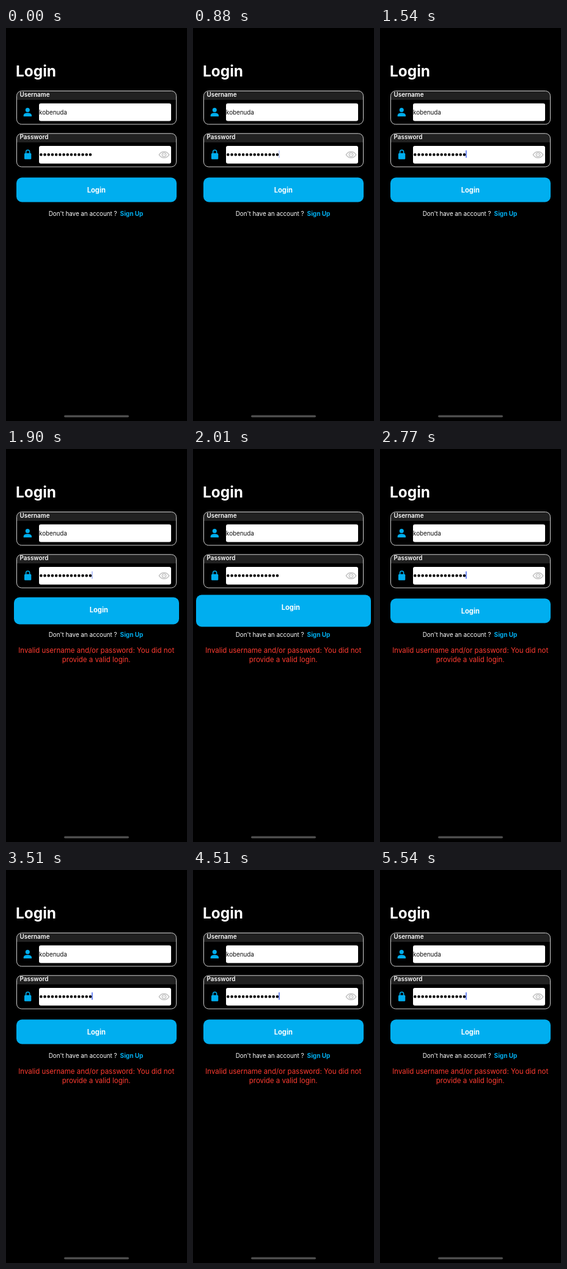
Animation of 296 by 640 pixels, one loop 5590 ms. Source, as an HTML page:

```html
<!DOCTYPE html>
<html lang="en">
<head>
<meta charset="utf-8">
<title>Login</title>
<style>
  @property --grow { syntax: "<length>"; inherits: true; initial-value: 0px; }
  html, body { margin: 0; width: 100%; height: 100%; overflow: hidden; background: #000; }
  svg { display: block; width: 100%; height: 100%; }
  text { font-family: Inter, Roboto, sans-serif; fill: #fff; }
  .title { font-size: 24.4px; font-weight: 700; }
  .label { font-size: 9.9px; font-weight: 600; }
  .value { font-size: 9.8px; fill: #111; }
  .hint { font-size: 9.8px; }
  .link { font-size: 10px; font-weight: 700; fill: #00aeef; }
  .error { font-size: 11.47px; fill: #ff3b30; text-anchor: middle; }
  .accent { fill: #00aeef; }
  #button rect {
    x: calc(17px - var(--grow));
    y: calc(243.5px - var(--grow) / 2);
    width: calc(262px + 2 * var(--grow));
    height: calc(40px + var(--grow));
  }
  #button text {
    font-size: 11.1px; font-weight: 700; text-anchor: middle;
    transform: translate(var(--grow), calc(var(--grow) / -2));
  }
</style>
</head>
<body>
<svg viewBox="0 0 296 640">
  <defs>
    <g id="field">
      <path d="M17.5 117V110.500a8 8 0 0 1 8-8H270.500a8 8 0 0 1 8 8V117Z" fill="#212121"/>
      <rect x="17.500" y="102.500" width="261" height="54.300" rx="8" fill="none" stroke="#d0d0d0"/>
      <rect x="54" y="122.800" width="216" height="28.700" rx="3" fill="#fff"/>
    </g>
  </defs>
  <rect width="296" height="640"/>
  <text class="title" x="16" y="79">Login</text>

  <use href="#field"/>
  <text class="label" x="22.500" y="111.600">Username</text>
  <g class="accent">
    <circle cx="35.300" cy="133.400" r="3.500"/>
    <path d="M28.700 144V142.500C28.700 139.500 32 138.300 35.300 138.300S42 139.500 42 142.500V144Z"/>
  </g>
  <text class="value" x="54" y="140.500">kobenuda</text>

  <use href="#field" y="69.300"/>
  <text class="label" x="22.500" y="181">Password</text>
  <rect class="accent" x="30" y="203.800" width="11.300" height="9.900" rx="1.500"/>
  <path d="M32.600 204.500V201.900a3.050 3.050 0 0 1 6.100 0V204.500" fill="none" stroke="#00aeef" stroke-width="1.500"/>
  <path d="M57.300 206.200H138.500" stroke="#000" stroke-width="4.600" stroke-linecap="round" stroke-dasharray="0 6.200"/>
  <rect id="caret" x="140.200" y="199.300" width="1.400" height="12" fill="#3458f0"/>
  <g fill="none" stroke="#bdbdbd" stroke-width="1.300">
    <path d="M250.300 206.300C254.500 199.600 262.500 199.600 266.700 206.300C262.500 213 254.500 213 250.300 206.300Z"/>
    <circle cx="258.500" cy="206.300" r="3.200"/>
    <circle cx="258.500" cy="206.300" r="1" fill="#bdbdbd" stroke="none"/>
  </g>

  <g id="button">
    <rect class="accent" rx="9"/>
    <text x="147.800" y="267.600">Login</text>
  </g>
  <text class="hint" x="69.800" y="305.800">Don't have an account ?</text>
  <text class="link" x="186.600" y="305.800">Sign Up</text>

  <g id="error">
    <text class="error" x="147.700" y="332.300">Invalid username and/or password: You did not</text>
    <text class="error" x="147.700" y="346.500">provide a valid login.</text>
  </g>
  <rect x="95" y="630.500" width="106" height="3.600" rx="1.800" fill="#4c4c4c"/>
</svg>
<script>
  const LOOP = 5590;

  // Holds each value from its time in ms until the next one.
  function hold(id, property, steps) {
    const frames = [...steps, [LOOP, steps.at(-1)[1]]].map(([ms, value]) => ({
      offset: ms / LOOP, [property]: value, easing: "steps(1, end)"
    }));
    document.getElementById(id).animate(frames, { duration: LOOP, iterations: Infinity })
      .startTime = 0;
  }

  const fade = (from, to, start, count, gap) =>
    Array.from({ length: count }, (_, i) =>
      [start + i * gap, from + (to - from) * (i + 1) / count]);
  const fadeIn = (...timing) => fade(0, 1, ...timing);
  const fadeOut = (...timing) => fade(1, 0, ...timing);

  hold("caret", "opacity", [
    [0, 0],
    ...fadeIn(240, 2, 130), ...fadeOut(750, 3, 125),
    ...fadeIn(1320, 3, 110), ...fadeOut(1900, 2, 110),
    ...fadeIn(2340, 2, 110), ...fadeOut(2880, 3, 110),
    ...fadeIn(3300, 3, 105), ...fadeOut(3870, 3, 130),
    ...fadeIn(4380, 2, 130), ...fadeOut(4890, 3, 130),
    [5540, 1]
  ]);
  hold("error", "opacity", [[0, 0], [1900, 1]]);
  hold("button", "--grow", [
    [0, "0px"], [1900, "4px"], [2010, "12px"], [2120, "4.5px"],
    [2230, "1.1px"], [2340, "0.4px"], [2450, "0px"]
  ]);
</script>
</body>
</html>
```
